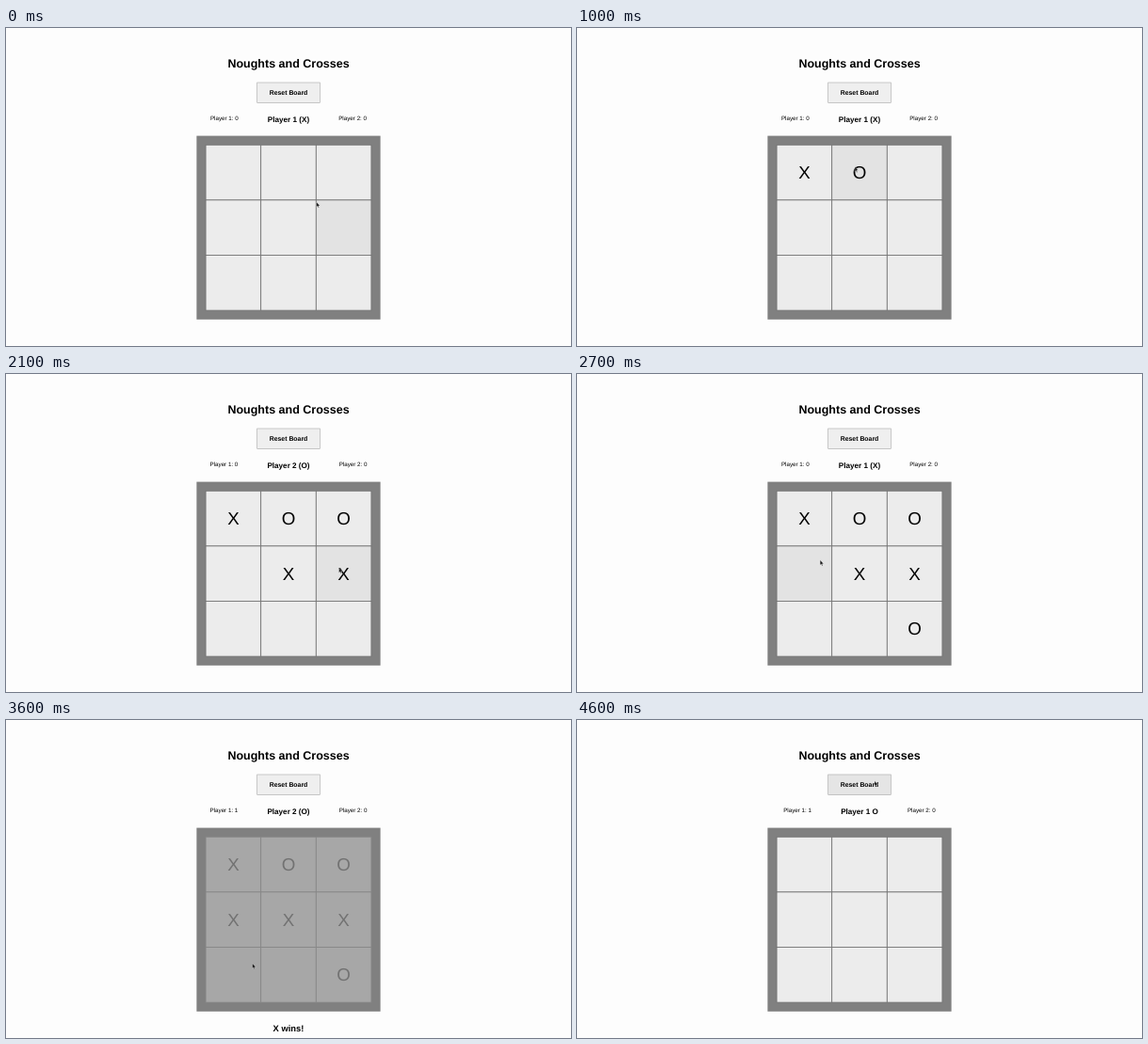
These frames come from a looping animation (600 by 338 pixels, 5.1 s). An HTML page:

```html
<!DOCTYPE html>
<html lang="en">
<head>
<meta charset="utf-8">
<title>Noughts and Crosses</title>
<style>
html, body { margin: 0; width: 100%; height: 100%; overflow: hidden; background: #fdfdfd; }
svg { display: block; width: 100vw; height: 100vh; }
text {
  font-family: "Liberation Sans", Arial, sans-serif;
  text-anchor: middle;
  text-rendering: geometricPrecision;
  fill: #000;
}
.bold { font-weight: bold; }
.label { font-size: 6.25px; }
.mark { font-size: 18.75px; }
</style>
</head>
<body>
<svg viewBox="0 0 600 338">
  <rect width="600" height="338" fill="#fdfdfd"/>
  <text class="bold" x="300" y="42.3" font-size="12.5">Noughts and Crosses</text>
  <rect id="button" x="266.7" y="58" width="66.6" height="21.6" stroke="#a8a8a8" stroke-width=".6"/>
  <text class="bold" x="300" y="71" font-size="6.9">Reset Board</text>
  <text id="score1" class="label" y="97.9"></text>
  <text id="turn" class="bold" x="300" y="99.9" font-size="8.15"></text>
  <text id="score2" class="label" y="97.9">Player 2: 0</text>
  <rect x="202.4" y="114.6" width="195.2" height="195.2" fill="#808080"/>
  <g id="cells" stroke-width=".8"></g>
  <g id="marks"></g>
  <text id="result" class="bold" x="300" y="331.2" font-size="9.37">X wins!</text>
  <path id="cursor" d="M0 0V5.2L1.2 4.2L2 6.1L2.8 5.8L2 3.9H3.6Z" fill="#111" stroke="#fff" stroke-width=".3"/>
</svg>
<script>
const LOOP = 5100, STEP = 100, RESET = 4500;
const SIZE = 58.6, LEFT = 300 - 1.5 * SIZE, TOP = 212.2 - 1.5 * SIZE;
const get = id => document.getElementById(id);

function add(parent, tag, attrs) {
  const node = document.createElementNS("http://www.w3.org/2000/svg", tag);
  for (const key in attrs) node.setAttribute(key, attrs[key]);
  return get(parent).appendChild(node);
}
const column = i => LEFT + (i % 3) * SIZE;
const row = i => TOP + Math.floor(i / 3) * SIZE;

// Crosses play first; the last move wins
const moves = [
  { at: 800, cell: 0 }, { at: 1000, cell: 1 }, { at: 1400, cell: 4 },
  { at: 1800, cell: 2 }, { at: 2100, cell: 5 }, { at: 2400, cell: 8 },
  { at: 2800, cell: 3 }
];
const WIN = moves[moves.length - 1].at;

// The pointer rests at each stop, then glides to the next
const stop = (arrive, leave, x, y) => ({ arrive, leave, x, y });
const clicks = moves.slice(0, -1).map(({ at, cell }) =>
  stop(at, at + STEP, column(cell) + SIZE / 2 - 5, row(cell) + SIZE / 2 - 6.2));
const stops = [
  stop(0, 0, 329.7, 185),
  stop(300, 400, 305, 167),
  stop(600, 600, 255.7, 159.8),
  ...clicks,
  stop(2700, WIN, 258.2, 197.8),
  stop(3000, 3500, 243, 254),
  stop(3600, 3600, 261.7, 258.8),
  stop(3900, 3900, 354, 172),
  stop(4100, 4100, 322, 56),
  stop(4200, LOOP, 316, 64.8)
];

function pointerAt(t) {
  const i = stops.findLastIndex(s => s.arrive <= t);
  const from = stops[i], to = stops[i + 1];
  if (t <= from.leave || !to) return from;
  const k = (t - from.leave) / (to.arrive - from.leave);
  return { x: from.x + (to.x - from.x) * k, y: from.y + (to.y - from.y) * k };
}

const cells = Array.from({ length: 9 }, (_, i) =>
  add("cells", "rect", { x: column(i), y: row(i), width: SIZE, height: SIZE }));
const marks = moves.map(({ cell }, i) => {
  const node = add("marks", "text", {
    class: "mark", x: column(cell) + SIZE / 2, y: row(cell) + 35.9
  });
  node.textContent = i % 2 ? "O" : "X";
  return node;
});

const inside = (p, x, y, w, h) =>
  p.x >= x && p.x < x + w && p.y >= y && p.y < y + h;
const show = (node, on) => node.setAttribute("visibility", on ? "visible" : "hidden");

function draw(time) {
  const t = Math.floor((time % LOOP) / STEP) * STEP;
  const pointer = pointerAt(t);
  const reset = t >= RESET;
  const won = t >= WIN && !reset;

  cells.forEach((cell, i) => {
    const hover = inside(pointer, column(i), row(i), SIZE, SIZE);
    cell.setAttribute("fill", won ? "#a7a7a7" : hover ? "#e3e3e3" : "#ececec");
  });
  get("cells").setAttribute("stroke", won ? "#868686" : "#727272");

  marks.forEach((mark, i) => {
    show(mark, t >= moves[i].at && !reset);
    mark.style.fill = won ? "#727272" : "#000";
  });

  const played = moves.filter(m => m.at <= t).length;
  const turn = get("turn");
  turn.textContent = reset ? "Player 1 O" : played % 2 ? "Player 2 (O)" : "Player 1 (X)";
  const offset = turn.getComputedTextLength() / 2 + 46;
  get("score1").textContent = "Player 1: " + (t >= WIN ? 1 : 0);
  get("score1").setAttribute("x", 300 - offset);
  get("score2").setAttribute("x", 300 + offset);

  const over = inside(pointer, 266.7, 58, 66.6, 21.6);
  get("button").setAttribute("fill", over ? "#e5e5e5" : "#efefef");
  show(get("result"), won);
  get("cursor").setAttribute("transform", `translate(${pointer.x} ${pointer.y})`);
}

let start;
function tick(now) {
  start ??= now;
  draw(now - start);
  requestAnimationFrame(tick);
}
draw(0);
requestAnimationFrame(tick);
</script>
</body>
</html>
```
